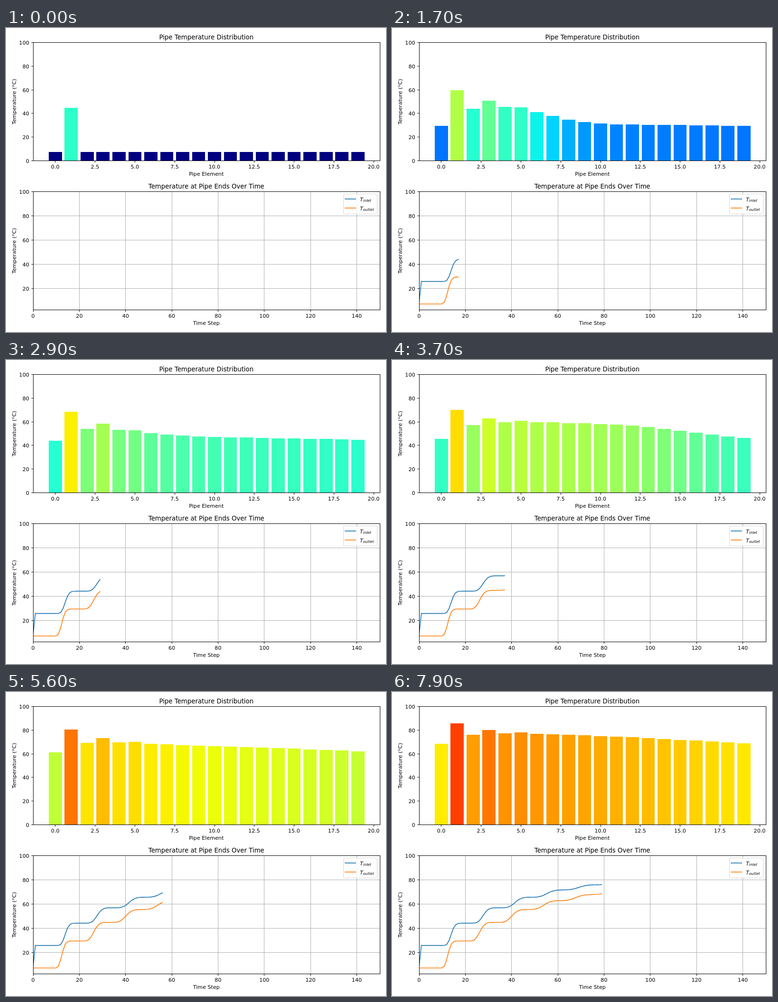
An HTML page for the animation above (8 s loop, 800 by 640 pixels).

```html
<!DOCTYPE html>
<html lang="en">
<head>
<meta charset="utf-8">
<title>Pipe temperature</title>
<style>
html, body { margin: 0; width: 100%; height: 100%; overflow: hidden; background: #fff; }
svg { display: block; font: 11.11px "DejaVu Sans", sans-serif; }
.title { font-size: 13.33px; }
.sub { font-size: 7.78px; }
.curve { fill: none; stroke-width: 1.67; stroke-linecap: square; stroke-linejoin: round; }
</style>
</head>
<body>
<svg id="stage" width="800" height="640" viewBox="0 0 800 640"></svg>
<script>
const STEP_MS = 100, STEPS = 80, CELLS = 20;
const AMBIENT = 7, SOURCE = 120, KEEP = 0.9903;
const BLUE = '#1f77b4', ORANGE = '#ff7f0e';
const LEFT = 57.5, RIGHT = 787.5;
const stage = document.getElementById('stage');

function add(tag, attrs, text, parent = stage) {
  const el = document.createElementNS('http://www.w3.org/2000/svg', tag);
  for (const key in attrs) el.setAttribute(key, attrs[key]);
  if (text !== undefined) el.textContent = text;
  parent.append(el);
  return el;
}
const line = (x1, y1, x2, y2, stroke = '#000') => add('line', { x1, y1, x2, y2, stroke });
const label = (x, y, text, anchor = 'middle', cls = '') =>
  add('text', { x, y, 'text-anchor': anchor, class: cls }, text);
const crisp = v => Math.floor(v + 0.5) + 0.5;

// Axis scales
const cellX = i => 103.35 + 33.515 * i;
const barY = t => 279.4 - 2.488 * t;
const stepX = n => 56.8 + 4.8667 * n;
const curveY = t => 598.8 - 2.544 * t;

// Each step moves the water 1.5 cells; cell 1 is heated and the last cell feeds the first.
function simulate() {
  let cells = Array(CELLS).fill(AMBIENT);
  const heat = t => t + (SOURCE - t) / 3;
  cells[1] = heat(AMBIENT);
  const states = [cells];
  while (states.length < STEPS) {
    const prev = cells;
    cells = prev.map((_, i) => {
      if (i === 0) return prev[CELLS - 1];
      if (i === 1) return heat(prev[0]);
      return AMBIENT + KEEP * ((prev[i - 1] + prev[i - 2]) / 2 - AMBIENT);
    });
    states.push(cells);
  }
  return states;
}

function jet(t) {
  const v = (t - AMBIENT) / (100 - AMBIENT);
  const ramp = (from, to) => Math.min(1, Math.max(0, (v - from) / (to - from)));
  const r = ramp(0.35, 0.66) - 0.5 * ramp(0.89, 1);
  const g = ramp(0.125, 0.375) - ramp(0.64, 0.91);
  const b = 0.5 + 0.5 * ramp(0, 0.11) - ramp(0.34, 0.65);
  return `rgb(${[r, g, b].map(c => Math.round(255 * c)).join()})`;
}

function frame(top, bottom, title, xLabel) {
  add('rect', { x: LEFT, y: top, width: RIGHT - LEFT, height: bottom - top, fill: 'none', stroke: '#000' });
  label(421.8, top - 6.8, title, 'middle', 'title');
  label(421.8, bottom + 31, xLabel);
  const mid = (top + bottom) / 2;
  add('text', { transform: `translate(20.5 ${mid}) rotate(-90)`, 'text-anchor': 'middle' }, 'Temperature (°C)');
}
function xTick(x, bottom, text) {
  line(crisp(x), bottom, crisp(x), bottom + 4);
  label(x + 0.3, bottom + 16, text);
}
function yTick(y, text) {
  line(LEFT - 4, y, LEFT, y);
  label(48.8, y + 4, text, 'end');
}

// Bar chart
const bars = Array.from({ length: CELLS }, (_, i) => {
  const x = Math.floor(cellX(i) - 12.91);
  return add('rect', { x, width: Math.floor(cellX(i) + 13.91) + 1 - x });
});
frame(30.5, 279.5, 'Pipe Temperature Distribution', 'Pipe Element');
for (let v = 0; v <= 20; v += 2.5) xTick(cellX(v), 279.5, v.toFixed(1));
for (let v = 0; v <= 100; v += 20) yTick(Math.round(279 - 2.49 * v) + 0.5, v);

// Line chart
add('rect', { x: 57, y: 344, width: 731, height: 250 }, undefined,
  add('clipPath', { id: 'plot' }));
const gridY = v => 344.5 + 51 * (100 - v) / 20;
for (let v = 20; v <= 140; v += 20) line(crisp(stepX(v)), 344.5, crisp(stepX(v)), 593.5, '#b0b0b0');
for (let v = 20; v <= 80; v += 20) line(LEFT, gridY(v), RIGHT, gridY(v), '#b0b0b0');
const curve = stroke => add('path', { class: 'curve', stroke, 'clip-path': 'url(#plot)' });
const inlet = curve(BLUE), outlet = curve(ORANGE);
frame(344.5, 593.5, 'Temperature at Pipe Ends Over Time', 'Time Step');
for (let v = 0; v <= 140; v += 20) xTick(stepX(v), 593.5, v);
for (let v = 20; v <= 100; v += 20) yTick(gridY(v), v);

// Legend
add('rect', { x: 710.5, y: 349.5, width: 71, height: 42, rx: 2.2,
  fill: '#fff', 'fill-opacity': 0.8, stroke: '#ccc', 'stroke-opacity': 0.8 });
[['inlet', BLUE, 360], ['outlet', ORANGE, 379]].forEach(([name, stroke, y]) => {
  add('path', { class: 'curve', stroke, d: `M714 ${y}H736` });
  const text = add('text', { x: 745, y: y + 4.5, 'font-style': 'italic' }, 'T');
  add('tspan', { class: 'sub', dy: 1.8 }, name, text);
});

const states = simulate();
const trace = (n, cell) => n < 1 ? '' : 'M' + states.slice(0, n + 1)
  .map((s, i) => `${stepX(i).toFixed(2)} ${curveY(s[cell]).toFixed(2)}`).join('L');

function render(ms) {
  const n = Math.floor(ms / STEP_MS) % STEPS;
  bars.forEach((bar, i) => {
    const t = states[n][i], y = Math.floor(barY(t));
    bar.setAttribute('y', y);
    bar.setAttribute('height', 279.5 - y);
    bar.setAttribute('fill', jet(t));
  });
  inlet.setAttribute('d', trace(n, 2));
  outlet.setAttribute('d', trace(n, 0));
}

let start;
function tick(now) {
  start ??= now;
  render(now - start);
  requestAnimationFrame(tick);
}
render(0);
requestAnimationFrame(tick);
</script>
</body>
</html>
```
